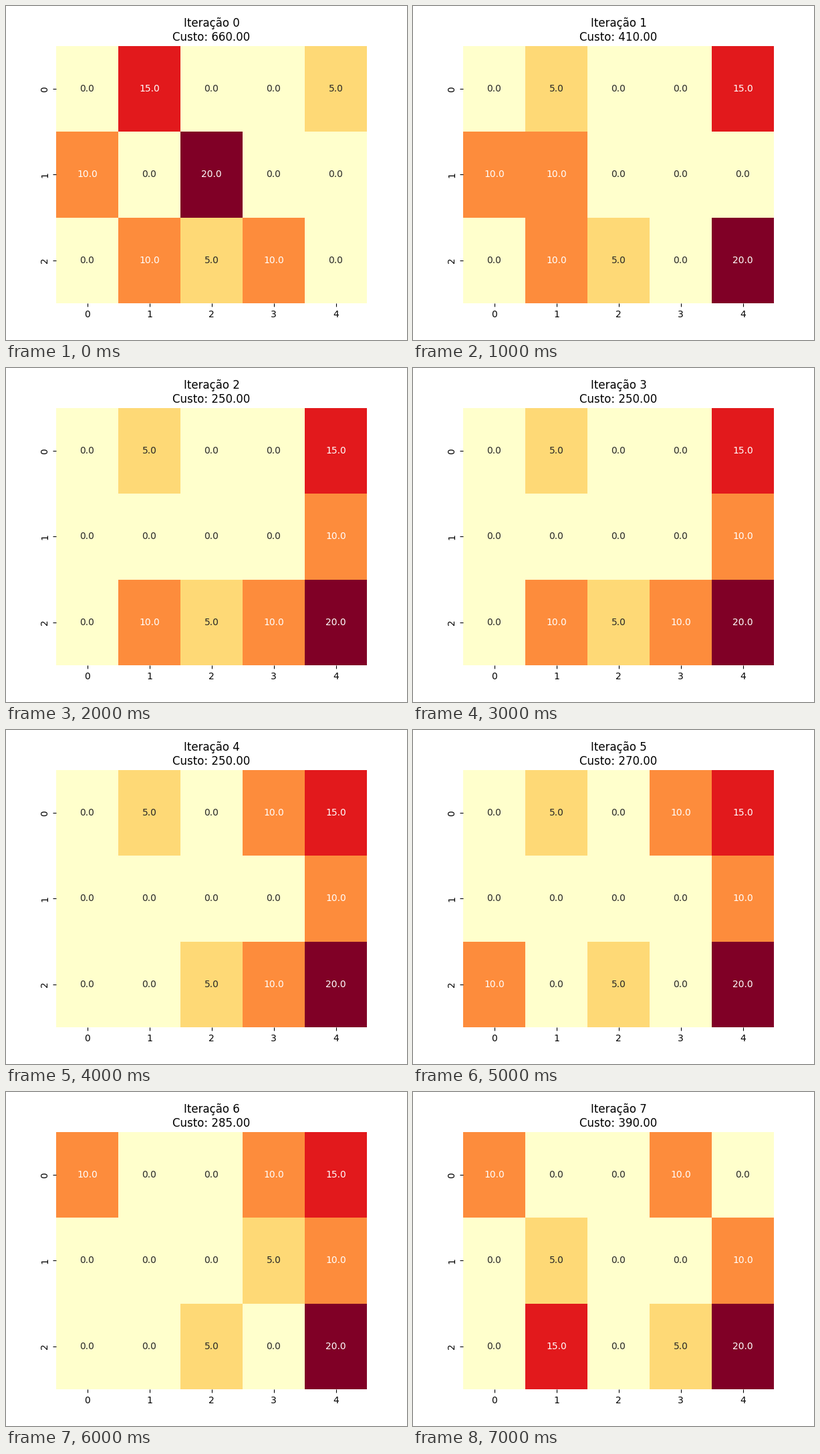
A matplotlib script that plays this animation: 600 px wide and 500 px high, repeating every 8000 ms.

```python
import numpy as np
import matplotlib.pyplot as plt
from matplotlib.animation import FuncAnimation

ROWS, COLS = 3, 5
START = [0, 15, 0, 0, 5,
         10, 0, 20, 0, 0,
         0, 10, 5, 10, 0]
# Cell pairs (row-major indices) swapped before each iteration.
SWAPS = [
    [],
    [(1, 4), (7, 14), (6, 13)],
    [(5, 9), (6, 13)],
    [],
    [(3, 11)],
    [(13, 10)],
    [(10, 0), (1, 8)],
    [(4, 11), (8, 6), (12, 13)],
]
COSTS = [660, 410, 250, 250, 250, 270, 285, 390]


def build_plans():
    plan, plans = list(START), []
    for swaps in SWAPS:
        for a, b in swaps:
            plan[a], plan[b] = plan[b], plan[a]
        plans.append(np.array(plan, float).reshape(ROWS, COLS))
    return plans


plans = build_plans()

plt.rcParams["font.family"] = "DejaVu Sans"
fig, ax = plt.subplots(figsize=(6, 5), dpi=100)
mesh = ax.pcolormesh(plans[0], cmap="YlOrRd", vmin=0, vmax=20)
ax.set(xlim=(0, COLS), ylim=(ROWS, 0))
ax.set_xticks(np.arange(COLS) + 0.5, range(COLS))
ax.set_yticks(np.arange(ROWS) + 0.5, range(ROWS), rotation="vertical", va="center")
ax.spines[:].set_visible(False)
title = ax.set_title("")
labels = [ax.text(c + 0.5, r + 0.5, "", ha="center", va="center")
          for r in range(ROWS) for c in range(COLS)]


def draw(i):
    mesh.set_array(plans[i])
    for label, value in zip(labels, plans[i].flat):
        label.set_text(f"{value:.1f}")
        label.set_color("w" if value >= 10 else ".15")
    title.set_text(f"Iteração {i}\nCusto: {COSTS[i]:.2f}")
    return [mesh, title, *labels]


anim = FuncAnimation(fig, draw, frames=len(plans), interval=1000, repeat=True)
plt.show()
```
